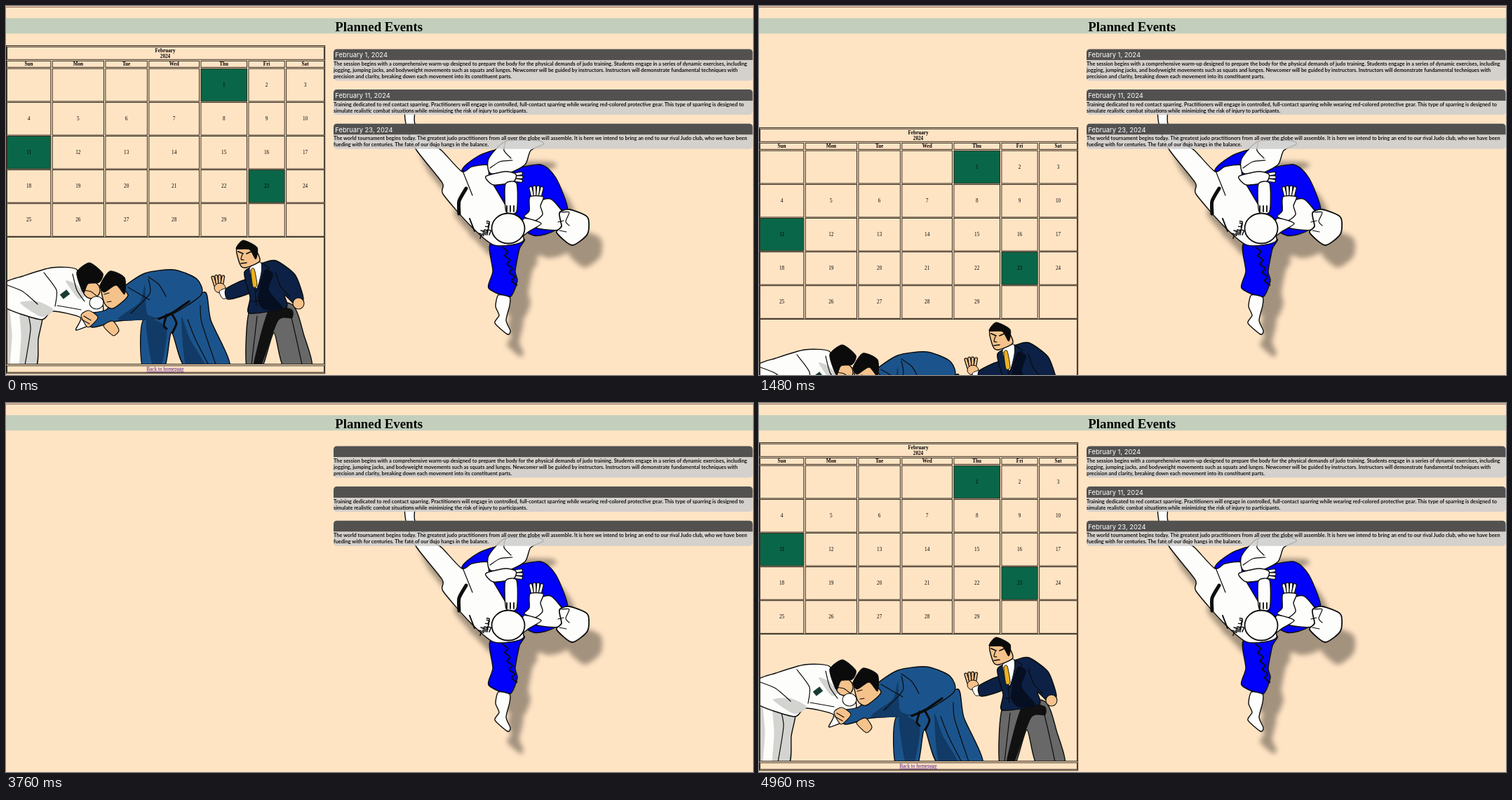
Recreate the animation shown at these times as an HTML page. Size 1065 by 526 pixels, loop 5.88 s.

```html
<!DOCTYPE html>
<html lang="en">
<head>
<meta charset="utf-8">
<title>Planned Events</title>
<style>
  html, body { margin: 0; width: 100%; height: 100%; overflow: hidden; background: #ffe4c4; }
  svg { display: block; width: 100%; height: 100%; }
  .serif { font-family: "Liberation Serif", "Times New Roman", serif; font-size: 7.2px; text-anchor: middle; }
  .bold { font-weight: 700; }
  .title { font: 700 18.8px "Liberation Serif", "Times New Roman", serif; text-anchor: middle; }
  .date { font: 400 9.4px Inter, sans-serif; fill: #fff; }
  .body { font: 700 7.34px Lato, sans-serif; fill: #141312; }
  .link { fill: #551a8b; text-decoration: underline; }
  .figure { stroke-linejoin: round; stroke-linecap: round; }
</style>
</head>
<body>
<svg id="stage" viewBox="0 0 1065 526" xmlns="http://www.w3.org/2000/svg"></svg>
<script>
const LOOP = 5880, STEP = 40;
const INK = '#0b0b0b', WHITE = '#fdfdfc', GREY = '#d3d3d0', BLUE = '#0000fb', SKIN = '#f6c28b';
const GI = '#1b548c', GI_DARK = '#123a66', NAVY = '#0c2145', NAVY_DARK = '#060f22';

const repeat = (n, f) => Array.from({ length: n }, (_, i) => f(i)).join('');
const text = (x, y, cls, s) => `<text x="${x}" y="${y}" class="${cls}">${s}</text>`;
const rect = (x, y, w, h, fill, extra = '') =>
  `<rect x="${x}" y="${y}" width="${w}" height="${h}" fill="${fill}" ${extra}/>`;
const oval = (x, y, rx, ry, fill, w = 1.4) =>
  `<ellipse cx="${x}" cy="${y}" rx="${rx}" ry="${ry}" fill="${fill}" stroke="${INK}" stroke-width="${w}"/>`;

// Smooth curve through a few key points
function curve(list, closed) {
  const p = list.split(' ').map(s => s.split(',').map(Number));
  const n = p.length, k = .12;
  const at = i => closed ? p[(i + n) % n] : p[Math.max(0, Math.min(n - 1, i))];
  const bezier = i => {
    const [a, b, c, e] = [at(i - 1), at(i), at(i + 1), at(i + 2)];
    return `C${b.map((v, j) => v + (c[j] - a[j]) * k)} ${c.map((v, j) => v - (e[j] - b[j]) * k)} ${c}`;
  };
  return 'M' + p[0] + repeat(closed ? n : n - 1, bezier);
}
const shape = (list, fill, w = 1.4) =>
  `<path d="${curve(list, true)}" fill="${fill}" stroke="${INK}" stroke-width="${w}"/>`;
const tone = (list, fill) => shape(list, fill, 0);
const line = (list, w = 1.2, color = INK) =>
  `<path d="${curve(list)}" fill="none" stroke="${color}" stroke-width="${w}"/>`;
const limb = (list, w, fill) => line(list, w + 2.4) + line(list, w, fill);

// Row of fingers fanned around a direction, in degrees
const fingers = (x, y, n, len, dir, fill, w = 3) => repeat(n, i => {
  const off = i - (n - 1) / 2, a = (dir + off * 9) * Math.PI / 180;
  const bx = x - Math.sin(a) * off * w * 1.2, by = y + Math.cos(a) * off * w * 1.2;
  return limb(`${bx},${by} ${bx + Math.cos(a) * len},${by + Math.sin(a) * len}`, w, fill);
});

// Jagged tear running down the trousers
const tear = (x, y, n) => line(Array.from({ length: n }, (_, i) =>
  `${x + i * 1.6 + (i % 2) * 6},${y + i * 6}`).join(' '), 1.8);

// Short creases scattered over a patch
function creases(x, y, w, h, n) {
  let seed = 7;
  const rnd = () => (seed = seed * 16807 % 2147483647) / 2147483647;
  return repeat(n, () => {
    const cx = x + rnd() * w, cy = y + rnd() * h;
    return line(`${cx},${cy} ${cx + 3 + rnd() * 2},${cy + 1} ${cx + 2},${cy + 7}`, 1.5);
  });
}

const thrower = () => `<g class="figure" filter="url(#drop)">` +
  shape('650,236 673,214 704,205 712,232 762,226 784,245 801,291 784,319 752,327 712,300 692,262', BLUE) +
  shape('691,338 694,378 688,402 718,415 729,392 726,378 732,346 738,332', BLUE) + tear(708, 344, 10) +
  shape('702,412 698,428 703,441 697,452 715,468 719,463 713,448 718,427 718,415', WHITE) +
  shape('569,150 571,172 585,205 622,252 623,268 661,312 696,341 738,334 717,292 690,246 687,227 664,229 650,236 621,206 601,192 583,168 582,150', WHITE) +
  line('656,260 646,278 646,296', 5) + line('651,235 657,250 665,270') + line('661,303 668,321', 2) +
  creases(674, 304, 14, 22, 9) +
  shape('690,238 688,218 712,193 758,192 766,197 748,206 740,226 715,239', WHITE) +
  line('712,193 710,206 720,217') + line('690,231 704,222 722,220') +
  fingers(724, 244, 3, 11, 0, WHITE) + shape('684,243 712,236 727,240 723,251 695,255', WHITE) +
  shape('712,254 728,253 728,293 713,293', WHITE) + repeat(3, i => line(`${714 + i * 5},285 ${714 + i * 5},293`, 1.8)) +
  shape('763,278 778,276 797,300 788,319 754,316 752,304', WHITE) +
  fingers(756, 270, 4, 12, -90, WHITE) + shape('747,272 766,272 762,285 765,297 754,306 739,300 746,292', WHITE) +
  shape('738,303 763,310 746,321 736,327', WHITE) +
  oval(716, 317, 23.5, 21.5, WHITE, 1.8) +
  shape('789,295 803,290 829,301 829,325 807,341 785,323 792,314', WHITE, 1.8) +
  line('792,294 803,294 798,307 803,313') + line('787,308 795,306') + line('789,320 799,322') +
  '</g>';

const whiteFighter = () =>
  shape('-4,428 51,430 46,475 42,515 -4,515', GREY) + line('12,434 15,470 12,512', 13, WHITE) +
  line('29,430 35,460 27,512') +
  shape('-4,396 24,385 65,373 100,375 112,399 137,421 135,446 100,462 106,444 66,435 50,447 -4,428', WHITE) +
  tone('20,423 45,421 68,433 50,443', GREY) + tone('85,392 100,397 112,413 103,417', GREY) +
  line('54,380 72,405 70,428') + line('2,398 24,407 45,425') + line('95,382 101,405 112,421') + line('73,427 107,433') +
  rect(-6, -4, 12, 8, '#183b31', 'transform="translate(84 411) rotate(-38)"') +
  oval(122, 405, 12, 12, SKIN) + line('109,405 121,407 130,414') +
  shape('101,379 119,366 138,381 133,394 117,396 111,409 106,400', INK, 1);

const blueFighter = () =>
  shape('196,447 250,428 284,408 292,448 319,515 256,515 236,465 226,515 195,515', GI) +
  tone('200,448 229,460 221,515 209,515', GI_DARK) + tone('250,443 262,474 285,515 257,515', GI_DARK) +
  line('277,427 279,451 299,511') + line('259,447 270,475 289,512') +
  shape('165,403 198,381 239,376 272,389 278,412 228,443 160,449 123,458 109,440 143,433', GI) +
  tone('198,397 201,438 216,446 160,447 191,422', GI_DARK) +
  line('203,389 205,410 178,438') + line('174,401 205,419') + line('203,386 218,397 228,414') +
  line('218,446 238,437 261,421', 3.2) + line('229,440 225,455 229,460', 3) + line('236,438 243,452 237,466', 3) +
  oval(129, 423, 10, 9, WHITE, 1.1) + shape('107,441 118,434 131,444 117,458', SKIN, 1.1) +
  repeat(2, i => line(`${111 - i * 3},${442 + i * 5} ${121 - i * 2},${448 + i * 5}`)) +
  shape('139,456 152,449 161,462 153,470', SKIN, 1.1) +
  shape('136,402 152,394 174,412 153,431 141,425', SKIN) + line('140,411 147,409') + line('144,422 150,421') +
  shape('134,398 148,378 169,387 169,411 157,398 140,408', INK, 1);

const referee = () =>
  shape('349,430 407,425 425,470 436,515 396,515 382,466 365,515 343,515', '#686868') +
  tone('375,432 407,432 408,445 388,449 363,515 352,515', '#111') +
  line('405,436 413,470 422,511') + line('358,442 350,511') +
  fingers(303, 397, 4, 12, -94, SKIN, 2.6) + oval(305, 402, 8, 7, SKIN, 1) +
  shape('304,407 313,403 319,415 309,417', WHITE, 1) +
  shape('314,403 343,390 349,408 317,418', NAVY) +
  shape('340,379 367,366 385,363 412,383 424,417 415,428 397,412 399,430 347,438 348,415', NAVY) +
  tone('368,377 381,382 375,405 395,431 369,433 359,418', NAVY_DARK) +
  line('384,379 391,399 404,414') + line('350,421 369,420') + line('355,403 357,427') +
  shape('347,374 363,365 364,380 357,403', WHITE, 1) + shape('349,377 354,375 358,398 352,400', '#edb120', .9) +
  line('364,366 375,374 369,380 357,407') +
  oval(417, 424, 8, 8, SKIN, 1.1) +
  shape('329,346 351,341 362,363 342,373 334,369', SKIN) +
  shape('328,346 338,334 358,344 356,361 347,347', INK, 1) +
  line('331,350 338,353', 1.8) + line('343,353 350,350', 1.8) + line('337,354 335,361 339,362') + line('335,367 343,366', 1.4);

function calendar() {
  const edges = [.2, 65, 140.7, 202.6, 276.7, 344.7, 398.4, 454.8];
  const days = ['Sun', 'Mon', 'Tue', 'Wed', 'Thu', 'Fri', 'Sat'];
  const marked = [1, 11, 23];
  const box = (x, y, r, b, fill = 'none') => rect(x, y, r - x, b - y, fill, 'stroke="#352b20"');
  const wide = (y, b) => box(1.5, y, 453.5, b);
  const column = (name, c) => {
    const x = edges[c] + 1.2, r = edges[c + 1] - 1.2, mid = (x + r) / 2;
    return box(x, 78.4, r, 87.4) + text(mid, 85.4, 'serif bold', name) + repeat(5, row => {
      const y = 89.3 + row * 48.1, day = row * 7 + c - 3;
      return box(x, y, r, y + 46.6, marked.includes(day) ? '#0a6648' : 'none') +
        (day > 0 && day < 30 ? text(mid, y + 25.4, 'serif', day) : '');
    });
  };
  return box(.5, 56.5, 454.7, 523.8) + wide(58.3, 76.3) +
    text(227, 65.6, 'serif bold', 'February') + text(227, 74, 'serif bold', '2024') +
    days.map(column).join('') +
    `<g class="figure" clip-path="url(#picture)">${whiteFighter() + blueFighter() + referee()}</g>` +
    wide(329.5, 510.5) + wide(512.8, 522.2) + text(227, 520, 'serif link', 'Back to homepage');
}

const events = [
  ['February 1, 2024',
    'The session begins with a comprehensive warm-up designed to prepare the body for the physical demands of judo training. Students engage in a series of dynamic exercises, including',
    'jogging, jumping jacks, and bodyweight movements such as squats and lunges. Newcomer will be guided by instructors. Instructors will demonstrate fundamental techniques with',
    'precision and clarity, breaking down each movement into its constituent parts.'],
  ['February 11, 2024',
    'Training dedicated to red contact sparring. Practitioners will engage in controlled, full-contact sparring while wearing red-colored protective gear. This type of sparring is designed to',
    'simulate realistic combat situations while minimizing the risk of injury to participants.'],
  ['February 23, 2024',
    'The world tournament begins today. The greatest judo practitioners from all over the globe will assemble. It is here we intend to bring an end to our rival Judo club, who we have been',
    'fueding with for centuries. The fate of our dojo hangs in the balance.'],
];

function cards() {
  let y = 61.5;
  return events.map(([date, ...lines]) => {
    const top = y, head = top + 15.8, bottom = top + 18 + lines.length * 9;
    y = bottom + 12.6;
    return `<path d="M467,${head}V${top + 5}q0,-5 5,-5H1059.5q5,0 5,5V${head}Z" fill="#525150"/>` +
      `<path d="M467,${head}H1064.5V${bottom - 5}q0,5 -5,5H472q-5,0 -5,-5Z" fill="#cdcdcd" fill-opacity=".86"/>` +
      lines.map((l, i) => text(467, top + 23.6 + i * 9, 'body', l)).join('') +
      `<g class="dates">${text(469.3, top + 11.8, 'date', date)}</g>`;
  }).join('');
}

document.getElementById('stage').innerHTML = `<defs>
  <clipPath id="picture">${rect(1.5, 329.5, 452, 181, INK)}</clipPath>
  <filter id="drop" x="-10%" y="-10%" width="130%" height="130%">
    <feDropShadow dx="18" dy="31" stdDeviation="3.5" flood-color="#000" flood-opacity=".36"/>
  </filter></defs>` +
  rect(0, 0, 1065, 526, '#ffe4c4') + rect(0, 1, 1065, 1, '#85594a') +
  rect(0, 17.3, 1065, 22, '#c3cfbc') + text(531.7, 36, 'title', 'Planned Events') +
  thrower() + cards() + `<g id="calendar">${calendar()}</g>`;

const dates = document.querySelectorAll('.dates');
const table = document.getElementById('calendar');

// CSS "ease" timing: cubic-bezier(.25, .1, .25, 1)
function ease(x) {
  if (x >= 1) return 1;
  let lo = 0, hi = 1;
  for (let i = 0; i < 24; i++) {
    const u = (lo + hi) / 2;
    if (.75 * u * (1 - u) + u ** 3 < x) lo = u; else hi = u;
  }
  return .3 * lo * (1 - lo) ** 2 + 3 * lo * lo * (1 - lo) + lo ** 3;
}

// Each page load: blank, dates appear, calendar slides up past its place, then snaps back
const loads = [
  { at: 800, font: 880, slide: 1040, end: 2000 },
  { at: 3760, font: 3800, slide: 3950, end: 4960 },
];

function draw(ms) {
  const t = Math.floor((ms % LOOP) / STEP) * STEP;
  const load = loads.find(l => t >= l.at && t < l.end);
  const hidden = load && t < load.slide;
  const y = load && !hidden ? Math.round(470 * (1 - ease((t - load.slide) / 1000)) - 7) : 0;
  dates.forEach(d => d.style.display = load && t < load.font ? 'none' : '');
  table.style.display = hidden ? 'none' : '';
  table.setAttribute('transform', `translate(0 ${y})`);
}

const start = performance.now();
function tick() {
  draw(performance.now() - start);
  requestAnimationFrame(tick);
}
tick();
</script>
</body>
</html>
```
